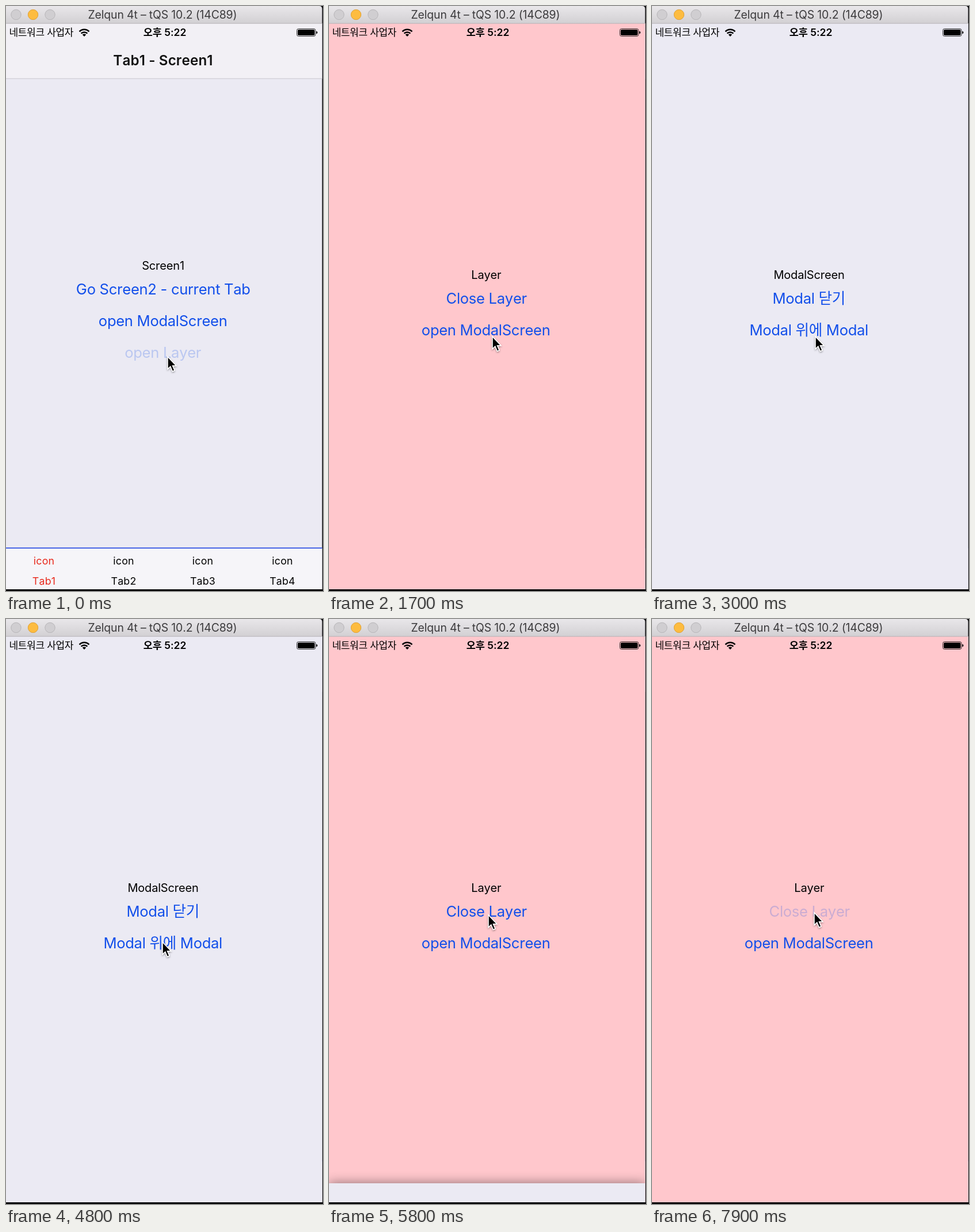
Write an HTML page that moves like this. It is 551 px wide and 1016 px high and loops after 8 s.

```html
<!DOCTYPE html>
<html lang="ko">
<head>
<meta charset="utf-8">
<style>
  html, body { margin: 0; width: 100%; height: 100%; overflow: hidden; background: #0b0b0d; }
  svg { display: block; width: 551px; height: 1016px; }
  text { font-family: Inter, "Noto Sans CJK KR", "Noto Sans CJK", sans-serif; font-kerning: none; text-anchor: middle; white-space: pre; }
  .heading { font-size: 24.2px; font-weight: 600; letter-spacing: .005em; }
  .label { font-size: 20px; letter-spacing: -.01em; }
  .link { font-size: 25.6px; letter-spacing: -.012em; fill: #124fea; }
  .tab { font-size: 17.8px; letter-spacing: .01em; }
  .status { font-size: 17px; letter-spacing: -.02em; }
  .clock { font-size: 17.5px; font-weight: 600; }
  .title { font-size: 19.4px; letter-spacing: -.007em; }
</style>
</head>
<body>
<svg viewBox="0 0 551 1016">
  <defs>
    <linearGradient id="chrome" x2="0" y2="1">
      <stop stop-color="#e9e7ea"/><stop offset="1" stop-color="#d2d0d3"/>
    </linearGradient>
    <clipPath id="screen"><rect y="30" width="549.5" height="983"/></clipPath>
    <filter id="soft" x="-10%" y="-10%" width="120%" height="120%"><feGaussianBlur stdDeviation="10"/></filter>
    <filter id="drop" x="-50%" y="-50%" width="200%" height="200%">
      <feDropShadow dx="0" dy="1.5" stdDeviation="1.5" flood-opacity=".4"/>
    </filter>
  </defs>

  <g clip-path="url(#screen)">
    <g id="home">
      <rect y="30" width="550" height="983" fill="#ebeaf3"/>
      <rect y="30" width="550" height="96" fill="#f2f0f5"/>
      <rect y="125.5" width="550" height="1.2" fill="#cfced4"/>
      <text class="heading" x="273" y="102.5" fill="#111">Tab1 - Screen1</text>
      <text class="label" x="273" y="458">Screen1</text>
      <text class="link" x="273.3" y="500.5">Go Screen2 - current Tab</text>
      <text class="link" x="272.7" y="556">open ModalScreen</text>
      <text class="link" x="272.7" y="611" opacity=".22">open Layer</text>
      <rect y="941" width="550" height="72" fill="#f6f5f9"/>
      <rect y="940.6" width="550" height="1.6" fill="#1a3fe0"/>
      <g id="tabs"></g>
    </g>
    <rect id="blank" y="30" width="550" height="983" fill="#fff"/>
    <g id="layer">
      <rect y="30" width="550" height="983" fill="#ffc7cc"/>
      <text class="label" x="273.3" y="474">Layer</text>
      <text id="closeLayer" class="link" x="273.7" y="517">Close Layer</text>
      <text id="openModal" class="link" x="272.7" y="572">open ModalScreen</text>
    </g>
    <g id="modal">
      <rect y="30" width="549.5" height="983" opacity=".45" filter="url(#soft)"/>
      <rect y="30" width="550" height="983" fill="#ebeaf3"/>
      <text class="label" x="273" y="474">ModalScreen</text>
      <text id="closeModal" class="link" x="272.7" y="517">Modal 닫기</text>
      <text class="link" x="272.7" y="572">Modal 위에 Modal</text>
    </g>
  </g>

  <!-- status bar -->
  <text class="status" x="5.5" y="52" style="text-anchor:start">네트워크 사업자</text>
  <text class="clock" x="276" y="52">오후 5:22</text>
  <g fill="none" stroke="#000" stroke-width="2.5">
    <path d="M127.5 44.3a12.2 12.2 0 0 1 17 0M130.6 47.6a7.7 7.7 0 0 1 10.8 0"/>
    <path d="M136 53l-3.2-3.3a4.6 4.6 0 0 1 6.4 0z" fill="#000" stroke="none"/>
    <rect x="505.5" y="39.5" width="32.5" height="13" rx="3" stroke-width=".8"/>
    <rect x="507" y="41" width="29.5" height="10" rx="1.8" fill="#000" stroke="none"/>
    <path d="M539.3 43.5q2.2.6 2.2 2.5t-2.2 2.5z" fill="#000" stroke="none"/>
  </g>

  <!-- window title bar -->
  <path d="M0 0H544.5q5 0 5 5V30H0z" fill="url(#chrome)"/>
  <rect y="29.7" width="549.5" height="1" fill="#b5b3b6"/>
  <g fill="#d0ced1" stroke="#b7b5b8">
    <circle cx="17.5" cy="15" r="8.7"/>
    <circle cx="47" cy="15" r="8.7" fill="#fdbc40" stroke="#e0a135"/>
    <circle cx="76.5" cy="15" r="8.7"/>
  </g>
  <text class="title" x="272" y="22" fill="#3c3b3d">Zelqun 4t – tQS 10.2 (14C89)</text>

  <path id="cursor" d="M0 1V22.5L4.8 18 8.3 26.5 12 25 8.5 16.8H14.8z" stroke="#fff" stroke-width="1.5" filter="url(#drop)"/>
</svg>
<script>
const LOOP = 8000, TRAVEL = 983, MODAL_OPENS = 2220, MODAL_CLOSES = 5515;
const $ = id => document.getElementById(id);
const ramp = (t, start, length) => Math.min(1, Math.max(0, (t - start) / length));
const smooth = u => u * u * (3 - 2 * u);
const shift = (id, x, y) => $(id).setAttribute('transform', `translate(${x} ${y})`);
const fade = (id, alpha) => $(id).setAttribute('opacity', alpha);

// Critically damped spring from 0 to 1
const spring = ms => {
  const x = 18.26 * Math.max(0, ms) / 1000;
  return x > 12 ? 1 : 1 - (1 + x) * Math.exp(-x);
};
const press = (t, down, up) => 1 - 0.78 * (ramp(t, down, 150) - ramp(t, up, 250));

// Cursor moves: start, end, x, y
const moves = [
  [0, 1, 281, 608],
  [1100, 1700, 284, 573],
  [3900, 4500, 272, 560],
  [4850, 5250, 277, 513],
  [6600, 7100, 282, 509]
];
function cursorAt(t) {
  let [, , x, y] = moves[0];
  for (const [start, end, toX, toY] of moves) {
    const u = smooth(ramp(t, start, end - start));
    x += (toX - x) * u;
    y += (toY - y) * u;
  }
  return [x, y];
}

[66, 204.5, 342, 480.5].forEach((x, i) => {
  const color = i ? '#000' : '#e8291c';
  $('tabs').innerHTML += `<g class="tab" fill="${color}"><text x="${x}" y="970">icon</text><text x="${x}" y="1005">Tab${i + 1}</text></g>`;
});

function draw(t) {
  const shown = t < 100 ? 0 : ramp(t, 50, 230);
  const covered = t < MODAL_CLOSES ? ramp(t, MODAL_OPENS, 270) : 0;
  shift('layer', 0, 100 * (1 - shown) ** 3);
  fade('layer', shown * (1 - covered));
  fade('blank', t > 1000 ? 1 : 0);

  const raised = spring(t - MODAL_OPENS) - spring(t - MODAL_CLOSES);
  shift('modal', 0, TRAVEL * (1 - raised));
  fade('modal', raised > 0.001 ? 1 : 0);

  fade('openModal', press(t, 1950, 2250));
  fade('closeModal', press(t, 5270, 5470));
  fade('closeLayer', press(t, 7650, LOOP));
  shift('cursor', ...cursorAt(t));
}

function tick() {
  draw(performance.now() % LOOP);
  requestAnimationFrame(tick);
}
tick();
</script>
</body>
</html>
```
